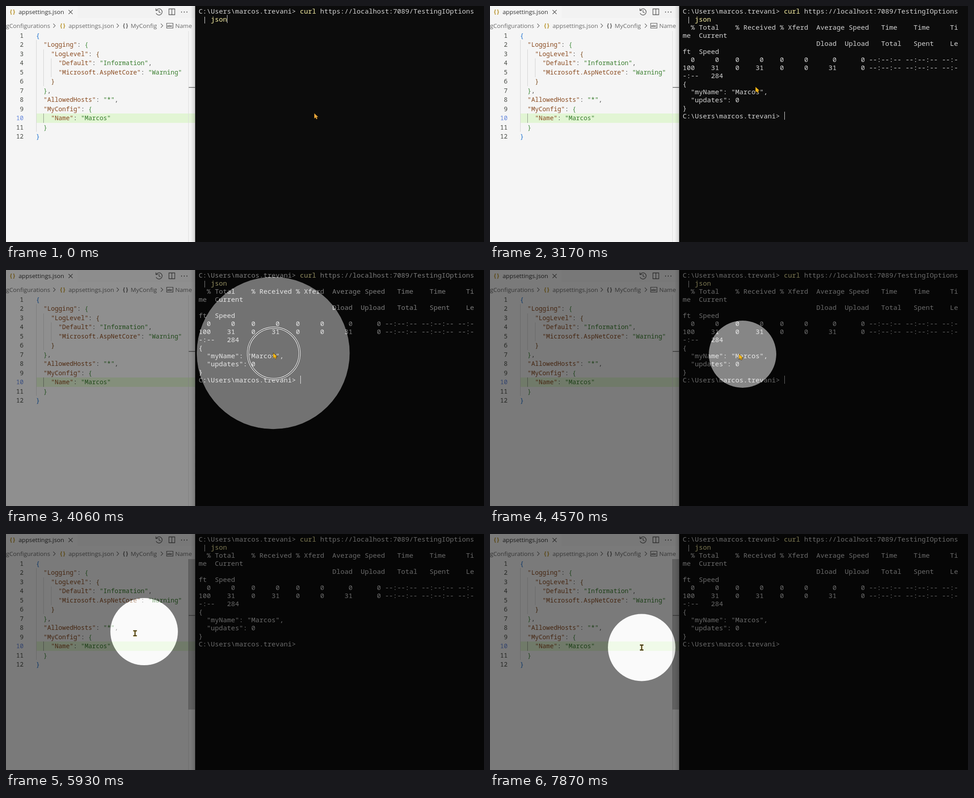
Write an HTML page with a canvas that moves like this. It is 1062 px wide and 527 px high and loops after 8 s.

```html
<!DOCTYPE html>
<html>
<head>
<meta charset="utf-8">
<style>
html, body { margin: 0; overflow: hidden; background: #0c0c0c; }
canvas { display: block; }
</style>
</head>
<body>
<canvas id="stage" width="1062" height="527"></canvas>
<script>
const ctx = document.getElementById('stage').getContext('2d');
const W = 1062, H = 527, SPLIT = 421, LOOP = 8000;
const UI = '13.25px "Open Sans", sans-serif';
const EDITOR = '13.85px "Noto Sans Mono", monospace';
const TERMINAL = '500 15px "Noto Sans Mono", monospace';
const editor = { x: 66.7, y: 66, cw: 8.31, lh: 20.47, activeLine: 9 };
const terminal = { x: 428, y: 2, cw: 9, lh: 18 };
const PROMPT = 'C:\\Users\\marcos.trevani> ';

const settings = JSON.stringify({
  Logging: { LogLevel: { Default: 'Information', 'Microsoft.AspNetCore': 'Warning' } },
  AllowedHosts: '*',
  MyConfig: { Name: 'Marcos' }
}, null, 2).split('\n');

const columns = [3, 6, 5, 6, 5, 6, 7, 7];
const progress = (percent, n) => [percent, n, 0, n, 0, 0, n, 0]
  .map((v, i) => String(v).padStart(columns[i])).join('') + ' --:--:-- --:--:-- --:-';

const output = [
  '  % Total    % Received % Xferd  Average Speed   Time    Time     Ti',
  'me  Current',
  ' '.repeat(33) + 'Dload  Upload   Total   Spent    Le',
  'ft  Speed',
  progress(0, 0),
  progress(100, 31),
  '-:--   284',
  ...JSON.stringify({ myName: 'Marcos', updates: 0 }, null, 2).split('\n'),
  PROMPT
];
const OUTPUT_START = 1330, OUTPUT_END = 1600;

// Pointer stops: time, x, y
const stops = [
  [2200, 685, 240], [2550, 600, 260], [2850, 590, 156], [3050, 616, 206], [3170, 590, 181],
  [4300, 595, 187], [5160, 463, 191], [5500, 461, 191], [6400, 97, 255], [7700, 337, 253.5]
];

const clamp = v => Math.max(0, Math.min(1, v));

function pointerAt(t) {
  const next = stops.findIndex(s => s[0] > t);
  if (next <= 0) return stops.at(next).slice(1);
  const [t0, x0, y0] = stops[next - 1], [t1, x1, y1] = stops[next];
  const k = (t - t0) / (t1 - t0);
  return [x0 + (x1 - x0) * k, y0 + (y1 - y0) * k];
}

function rect(color, x, y, w, h) {
  ctx.fillStyle = color;
  ctx.fillRect(x, y, w, h);
}

function text(str, x, y, font, color, align = 'left') {
  ctx.font = font;
  ctx.fillStyle = color;
  ctx.textAlign = align;
  ctx.fillText(str, x, y);
}

function stroke(path, color, width = 1) {
  ctx.strokeStyle = color;
  ctx.lineWidth = width;
  ctx.stroke(new Path2D(path));
}

function circle(x, y, r) {
  ctx.beginPath();
  ctx.arc(x, y, r, 0, Math.PI * 2);
}

function drawHeader() {
  rect('#f2f2f2', 159, 0, SPLIT - 159, 27);
  const braces = 'bold 11.5px "Noto Sans Mono", monospace';
  const gray = '#555', muted = '#6a6a6a', gold = '#b58d1f';
  text('{}', 7.5, 17, braces, gold);
  text('appsettings.json', 28, 18, UI, '#333');
  stroke('M139 9l9 9M148 9l-9 9', gray, 1.2);
  stroke('M334 9.5A7 7 0 1 1 333.5 16M333 5.5V10H337.5M340 9V13.5L343.5 15.5', gray, 1.3);
  stroke('M362 6.5H375V19.5H362ZM368.5 6.5V19.5', gray, 1.3);
  for (let i = 0; i < 3; i++) rect(gray, 389 + i * 6, 12.5, 2, 2);

  text('gConfigurations', 0, 49, UI, muted);
  text('{}', 119, 48, braces, gold);
  text('appsettings.json', 139, 49, UI, muted);
  text('{}', 258.5, 48, braces, gray);
  text('MyConfig', 277, 49, UI, muted);
  for (const x of [105, 246, 344]) stroke(`M${x} 39.5l4.5 4.5l-4.5 4.5`, muted, 1.1);
  stroke('M357 38.5H371V49.5H357Z', gray, 1.2);
  text('abc', 364, 46.5, 'bold 6.5px "Open Sans", sans-serif', gray, 'center');
  text('Name', 376, 49, UI, muted);
}

function drawSettings() {
  const bracket = ['#1a6fd0', '#3f8a3a', '#7b4a1c'];
  let depth = 0;
  settings.forEach((line, i) => {
    const active = i === editor.activeLine;
    const middle = editor.y + i * editor.lh, top = Math.round(middle - editor.lh / 2), base = middle + 5;
    if (active) rect('#e2f5d4', 67, top, SPLIT - 67, 21);
    for (let col = 0; col < line.search(/\S/); col += 2)
      rect(active && col ? '#8b9285' : '#d2d2d2', Math.round(editor.x + col * editor.cw), top, 1, 21);
    text(i + 1, 39, base, EDITOR, active ? '#6688dd' : '#484b45', 'right');

    for (const { 0: token, index } of line.matchAll(/"[^"]*"|[{}:,]/g)) {
      let color = '#555';
      if (token === '{') color = bracket[depth++];
      else if (token === '}') color = bracket[--depth];
      else if (token[0] === '"') color = line[index + token.length] === ':' ? '#8a4b20' : '#367c2b';
      text(token, editor.x + index * editor.cw, base, EDITOR, color);
    }
  });
}

function drawEditor(t) {
  rect('#f5f5f5', 0, 0, SPLIT, H);
  drawHeader();
  drawSettings();
  rect('#dcdcdc', 405, 56, 1, H - 56);
  rect(`rgba(100,100,100,${0.36 * clamp((t - 5520) / 150)})`, 405, 56, 16, 336);
  rect('#666', 406, 181, 14, 1.5);
  const shadow = ctx.createLinearGradient(410, 0, SPLIT, 0);
  shadow.addColorStop(0, 'rgba(0,0,0,0)');
  shadow.addColorStop(1, 'rgba(0,0,0,0.15)');
  rect(shadow, 410, 0, SPLIT - 410, H);
}

function drawTerminal(t) {
  rect('#0c0c0c', SPLIT, 0, W - SPLIT, H);
  rect('#3a3a3a', SPLIT - 1, 0, 1, H);
  const put = (row, col, str, color = '#d4d4d4') =>
    text(str, terminal.x + col * terminal.cw, terminal.y + 15 + row * terminal.lh, TERMINAL, color);

  put(0, 0, PROMPT);
  put(0, 25, 'curl', '#f9f1a5');
  put(0, 30, 'https://localhost:7089/TestingIOptions');
  put(1, 1, '|');
  put(1, 3, 'json', '#f9f1a5');
  const shown = Math.floor((t - OUTPUT_START) / (OUTPUT_END - OUTPUT_START) * (output.length - 1)) + 1;
  output.slice(0, Math.max(0, shown)).forEach((line, i) => put(i + 2, 0, line));

  // The blink restarts when the command runs
  const caretOn = t < 1130 ? t < 600 : Math.floor((t - 1930) / 530) % 2 === 0;
  const [row, col] = t < 1260 ? [1, 7] : [output.length + 1, 25];
  if (caretOn && (t < 1260 || t >= OUTPUT_END))
    rect('#e0e0e0', terminal.x + col * terminal.cw + (t < 1260 ? 0 : 1), terminal.y + row * terminal.lh, 1, 18);
}

function drawSpotlight(t) {
  const ease = 1 - (1 - clamp((t - 3712) / 760)) ** 3;
  if (ease > 0) {
    const [x, y] = pointerAt(t - 50);
    circle(x, y, 75 + 600 * (1 - ease));
    ctx.fillStyle = `rgba(255,255,255,${0.5 * ease})`;
    ctx.fill();
    ctx.rect(0, 0, W, H);
    ctx.fillStyle = `rgba(0,0,0,${0.5 * ease})`;
    ctx.fill('evenodd');
  }
}

// Shrinking double ring around the pointer
function drawRing(t) {
  const r = 110 * (1 - (t - 3840) / 475);
  if (t < 3840 || r < 4) return;
  const [x, y] = pointerAt(t);
  const ring = (radius, width, color) => {
    circle(x + 1, y + 0.5, radius);
    ctx.strokeStyle = color;
    ctx.lineWidth = width;
    ctx.stroke();
  };
  ring(r - 1.5, 4, '#444');
  ring(r, 1.2, '#fff');
  ring(r - 3, 1.2, '#fff');
}

function drawPointer(t) {
  const [x, y] = pointerAt(t);
  ctx.save();
  ctx.translate(x, y);
  if (x < 405) {
    const beam = 'M-4 -5.5H4M-4 5.5H4M0 -5.5V5.5';
    stroke(beam, '#c9a437', 3);
    stroke(beam, '#33301f', 1.8);
  } else {
    const arrow = 'M0 0V11L2.7 8.6L4.6 12.6L6.6 11.7L4.8 7.8H8.4Z';
    stroke(arrow, '#3a2a08', 1.2);
    ctx.fillStyle = t < 2200 ? '#e9a63c' : '#ffbb16';
    ctx.fill(new Path2D(arrow));
  }
  ctx.restore();
}

function frame(now) {
  const t = now % LOOP;
  for (const draw of [drawEditor, drawTerminal, drawSpotlight, drawRing, drawPointer]) draw(t);
  requestAnimationFrame(frame);
}
requestAnimationFrame(frame);
</script>
</body>
</html>
```
